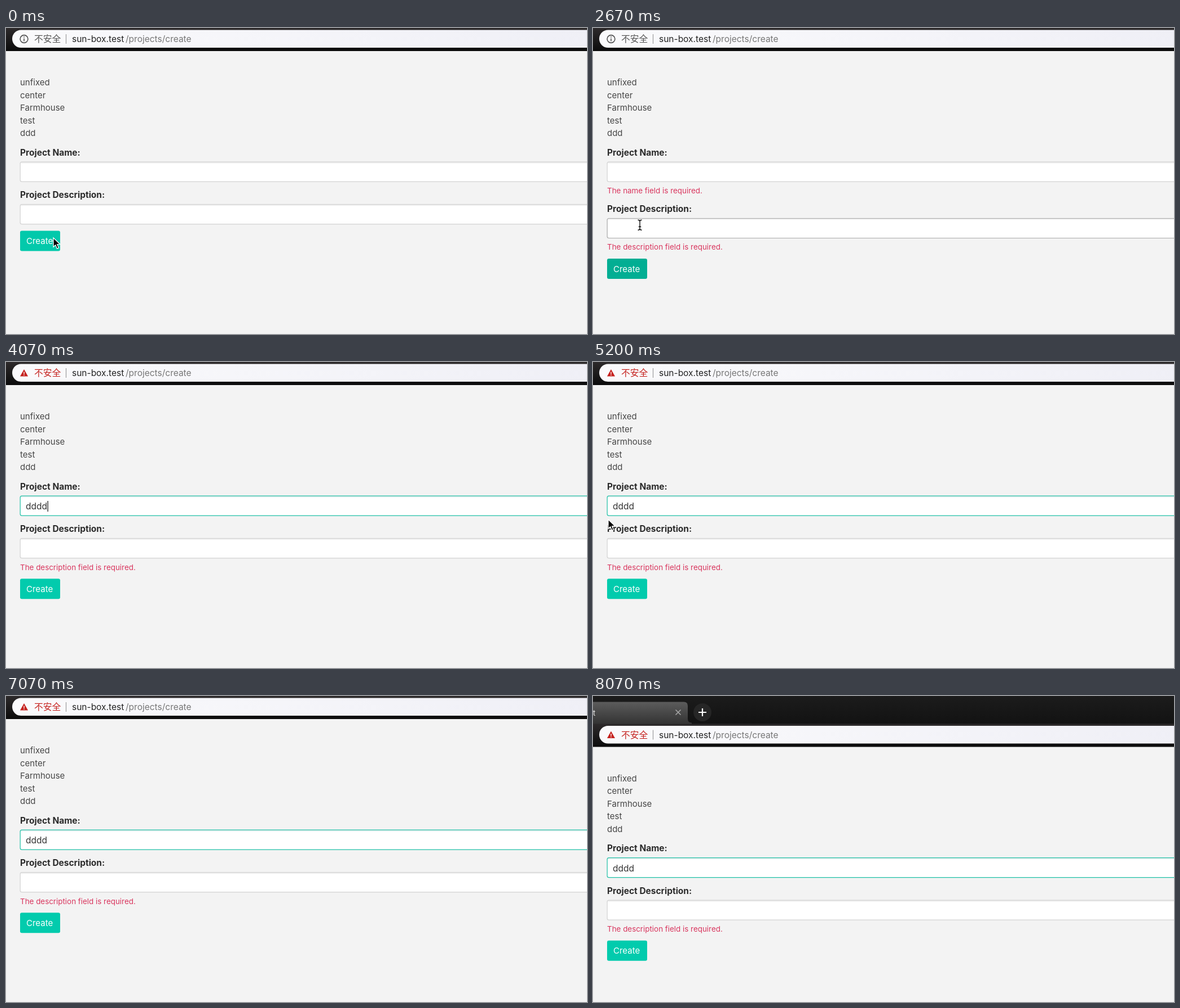
Animation of 1030 by 544 pixels, one loop 8.14 s. Source, as an HTML page:

```html
<!DOCTYPE html>
<html lang="en">
<head>
<meta charset="utf-8">
<title>Create project</title>
<style>
  html, body { margin: 0; width: 100%; height: 100%; overflow: hidden; background: #f3f3f3; }
  svg { display: block; width: 1030px; height: 544px; }
  text { font: 15px Inter, "Noto Sans CJK SC", sans-serif; fill: #464646; white-space: pre; }
  .label { font-size: 15.5px; font-weight: 700; fill: #2b2b2b; }
  .help { font-size: 13.4px; fill: #d9365e; }
  .url { font-size: 15.5px; fill: #777; }
  .cjk { font: 15.8px "Noto Sans CJK SC", "Noto Sans CJK", sans-serif; }
  .option { font-size: 14.7px; font-weight: 500; fill: #1d1d1d; }
  .option.cjk { font-size: 15px; font-weight: 700; }
  .field { fill: #fff; stroke-width: 1.2; }
</style>
</head>
<body>
<svg viewBox="0 0 1030 544">
  <defs>
    <linearGradient id="strip" x2="0" y2="1"><stop stop-color="#1c1c1c"/><stop offset="1" stop-color="#121212"/></linearGradient>
    <linearGradient id="tab" x2="0" y2="1"><stop stop-color="#5c5c5c"/><stop offset="1" stop-color="#323232"/></linearGradient>
    <linearGradient id="toolbar" x2="0" y2="1"><stop stop-color="#2d2a2b"/><stop offset="1" stop-color="#0b0b0b"/></linearGradient>
    <linearGradient id="omnibox"><stop stop-color="#fafafc"/><stop offset="1" stop-color="#efeff6"/></linearGradient>
    <filter id="shadow" x="-10%" y="-10%" width="120%" height="120%">
      <feDropShadow dx="0" dy="1" stdDeviation="2" flood-opacity=".35"/>
    </filter>
  </defs>

  <g id="page">
    <rect y="-50" width="1030" height="51" fill="url(#strip)"/>
    <path d="M0-39H161Q168-39 168-32V-9Q168-2 175-2V1H0Z" fill="url(#tab)"/>
    <text x="0" y="-15" style="font-size:13px;fill:#eee">t</text>
    <path d="M146.5-25l9 9m0-9l-9 9" stroke="#aaa" stroke-width="1.5"/>
    <circle cx="194" cy="-20.5" r="16" fill="#262626"/>
    <path d="M187-20.5h14m-7-7v14" stroke="#fff" stroke-width="2.2"/>

    <rect width="1030" height="41" fill="url(#toolbar)"/>
    <rect x="11" y="3.5" width="1050" height="31.5" rx="15.7" fill="url(#omnibox)"/>
    <g id="info" fill="none" stroke="#505050" stroke-width="1.6">
      <circle cx="32" cy="19.5" r="6.9"/>
      <path d="M32 18.5v5M32 15v1.7"/>
    </g>
    <g id="warning">
      <path d="M32 13L39 25.5H25Z" fill="#c5221f"/>
      <path d="M32 17.5v4M32 22.5v1.6" stroke="#fff" stroke-width="1.4"/>
    </g>
    <text id="insecure" class="cjk" x="50" y="25">不安全</text>
    <path d="M106.5 11v17" stroke="#8d8d8d"/>
    <text class="url" x="117" y="25" style="fill:#222">sun-box.test</text>
    <text class="url" x="212" y="25">/projects/create</text>

    <g id="list"></g>

    <text class="label" x="25" y="226.5">Project Name:</text>
    <rect id="nameField" class="field" x="25.2" y="238.2" width="1100" height="35" rx="3"/>
    <path d="M27 239.8H1030" stroke="#000" stroke-opacity=".06" stroke-width="2"/>
    <text id="typed" x="35" y="262.3" style="font-size:15.5px;fill:#333"></text>
    <path id="caret" d="M0 247v19" stroke="#222" stroke-width="1.3"/>
    <text id="nameHelp" class="help" x="25" y="294">The name field is required.</text>

    <g id="descGroup">
      <text class="label" x="25" y="302">Project Description:</text>
      <rect id="descField" class="field" x="25.2" y="313.7" width="1100" height="35" rx="3"/>
      <path d="M27 315.3H1030" stroke="#000" stroke-opacity=".06" stroke-width="2"/>
      <text id="descHelp" class="help" x="25" y="369.7">The description field is required.</text>
    </g>

    <g id="button">
      <rect id="buttonFace" x="25" y="360.5" width="71" height="36" rx="3"/>
      <text x="36" y="384" style="fill:#fff">Create</text>
    </g>

    <g id="menu">
      <path d="M25 274H214V532.5Q214 536.5 210 536.5H29Q25 536.5 25 532.5Z" fill="#fff" filter="url(#shadow)"/>
    </g>
  </g>

  <path id="arrow" d="M0 0V16.2L3.8 12.8L6.5 19.2L9.4 18L6.7 11.7L11.8 11.5Z" stroke="#fff" stroke-width="1.3"/>
  <g id="beam" fill="none">
    <path d="M-3.5-9Q0-9 0-6.5Q0-9 3.5-9M0-7V7M-3.5 9Q0 9 0 6.5Q0 9 3.5 9M-2.2 3H2.2" stroke="#fff" stroke-opacity=".8" stroke-width="3"/>
    <path d="M-3.5-9Q0-9 0-6.5Q0-9 3.5-9M0-7V7M-3.5 9Q0 9 0 6.5Q0 9 3.5 9M-2.2 3H2.2" stroke="#111" stroke-width="1.4"/>
  </g>
</svg>

<script>
const LOOP = 8140;
const ERROR_HEIGHT = 24.8;
const BORDER = { idle: '#d2d2d2', hover: '#a9a9a9', focus: '#1fc0a6' };
const BUTTON = { idle: '#02cbad', hover: '#02c9ab', active: '#02ae93' };

// time, x, y, pointer shape from this time on
const POINTER = [
  [0, 84, 373, 'arrow'],
  [1870, 84, 371, 'beam'],
  [2070, 83, 350.5, 'beam'],
  [2670, 83, 350.5, 'beam'],
  [2870, 92, 300, 'beam'],
  [3070, 109.5, 257, 'beam'],
  [3600, 109.5, 257, ''],
  [4870, 105, 258, 'beam'],
  [5070, 36, 266, 'beam'],
  [5130, 27, 276, 'arrow'],
  [5200, 27, 280, 'arrow'],
  [5400, 32, 307, 'arrow'],
  [5470, 38, 318, 'beam'],
  [5670, 60, 334, 'beam'],
  [5730, 62, 337, 'beam'],
  [6070, 73.5, 371, 'beam'],
  [6200, 72, 386, 'arrow'],
  [6530, 43, 446, 'arrow'],
  [6800, 43, 446, 'arrow'],
  [7000, 423, 446, 'arrow'],
  [7070, 423, 446, '']
];
const KEYS = [3600, 3800, 3930, 4070];
const SLIDE = [[7330, 10], [7400, 36], [7470, 49.5]];

const $ = id => document.getElementById(id);
const within = (t, from, to) => t >= from && t < to;
const show = (id, on) => $(id).setAttribute('visibility', on ? 'visible' : 'hidden');
const move = (id, x, y) => $(id).setAttribute('transform', `translate(${x} ${y})`);
const paint = (id, name, color) => $(id).setAttribute(name, color);

function addText(parent, content, x, y, className = '') {
  const node = document.createElementNS('http://www.w3.org/2000/svg', 'text');
  node.textContent = content;
  node.setAttribute('x', x);
  node.setAttribute('y', y);
  node.setAttribute('class', className);
  $(parent).append(node);
}

['unfixed', 'center', 'Farmhouse', 'test', 'ddd']
  .forEach((name, i) => addText('list', name, 25, 102.3 + i * 22.5));
['unfixed', 'center', 'Farmhouse', '未命名数据连接(1)', '甲一号', 'test row 0314']
  .forEach((name, i) => addText('menu', name, 38.5, 310 + i * 40.55,
    /[^\x00-\x7f]/.test(name) ? 'option cjk' : 'option'));

function pointerAt(t) {
  const i = POINTER.findLastIndex(step => step[0] <= t);
  const [start, x, y, shape] = POINTER[i];
  const [end, nextX, nextY] = POINTER[i + 1] || [LOOP, x, y];
  const k = (t - start) / (end - start);
  return { x: x + (nextX - x) * k, y: y + (nextY - y) * k, shape };
}

function drawForm(t) {
  const failed = t >= 930;
  const nameError = failed && t < KEYS[0];
  const focused = t >= 3270;
  const descShift = nameError ? ERROR_HEIGHT : 0;

  show('nameHelp', nameError);
  show('descHelp', failed);
  move('descGroup', 0, descShift);
  move('button', 0, descShift + (failed ? ERROR_HEIGHT : 0));

  paint('nameField', 'stroke', focused ? BORDER.focus
    : within(t, 2990, 3270) ? BORDER.hover : BORDER.idle);
  paint('descField', 'stroke',
    within(t, 1870, 2730) || within(t, 5470, 5870) ? BORDER.hover : BORDER.idle);
  paint('buttonFace', 'fill', within(t, 730, 3270) ? BUTTON.active
    : t < 730 || within(t, 6200, 6400) ? BUTTON.hover : BUTTON.idle);

  $('typed').textContent = 'd'.repeat(KEYS.filter(key => key <= t).length);
  const textWidth = t < KEYS[0] ? 0 : $('typed').getComputedTextLength();
  move('caret', 35.6 + textWidth + (textWidth ? 0.6 : 0), 0);
  show('caret', within(t, 3270, 4470) || within(t, 8000, 8070));
  show('menu', within(t, 3270, KEYS[0]));
}

function drawBrowser(t) {
  const warned = t >= 3670;
  show('info', !warned);
  show('warning', warned);
  $('insecure').style.fill = warned ? '#c5221f' : '#555';
  const slide = SLIDE.findLast(step => step[0] <= t);
  move('page', 0, slide ? slide[1] : 0);
}

function drawPointer(t) {
  const { x, y, shape } = pointerAt(t);
  for (const id of ['arrow', 'beam']) {
    show(id, id === shape);
    move(id, x, y);
  }
}

const started = performance.now();
function frame() {
  const t = (performance.now() - started) % LOOP;
  drawForm(t);
  drawBrowser(t);
  drawPointer(t);
  requestAnimationFrame(frame);
}
frame();
</script>
</body>
</html>
```
